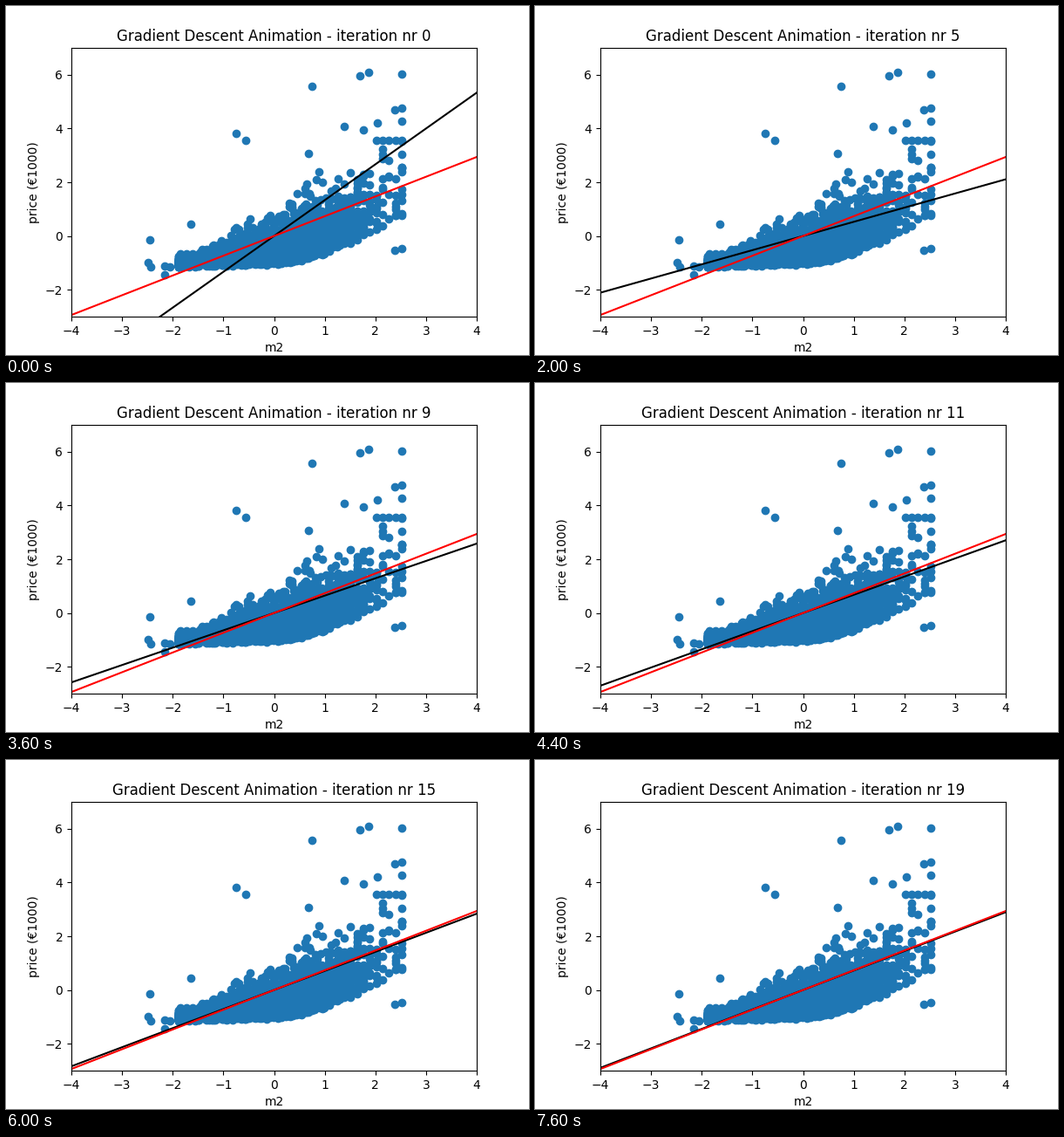
A matplotlib script for the animation above (8 s loop, 600 by 400 pixels).

```python
import numpy as np
import matplotlib.pyplot as plt
from matplotlib.animation import FuncAnimation

FRAMES, INTERVAL = 20, 400
BEST_SLOPE = 0.735
START_SLOPE = 4 / 3
DECAY = 0.81

SIZE_STEP = 0.126  # large homes come in rounded sizes
MIN_SIZE, MAX_SIZE = -1.88, 20 * SIZE_STEP

# Homes far from the main cloud: size, price
OUTLIERS = [
    (-0.75, 3.82), (-0.56, 3.56), (0.75, 5.57), (1.69, 5.96), (1.87, 6.09),
    (2.52, 6.03), (1.38, 4.08), (1.76, 3.95), (2.04, 4.20), (2.39, 4.69),
    (2.52, 4.75), (2.52, 4.27), (0.68, 3.07), (-2.46, -0.15), (-2.48, -1.0),
    (-2.43, -1.15), (-2.16, -1.13), (-2.05, -1.14), (-2.16, -1.43),
    (2.39, -0.53), (2.52, -0.47), (-1.64, 0.45),
]


def homes(count=1700):
    """Sizes are normal; prices are skewed and spread out as size grows."""
    rng = np.random.default_rng(11)
    size = np.clip(rng.normal(size=count), MIN_SIZE, MAX_SIZE)
    size = np.where(size > 1.3, np.round(size / SIZE_STEP) * SIZE_STEP, size)
    floor = -1.17 + 0.05 * (size + 1.9) + 0.35 * np.maximum(size, 0) ** 1.7
    price = floor + (3 + 1.2 * size) * rng.beta(1.5, 6, count)
    round_priced = [(k * SIZE_STEP, 3.56) for k in range(16, 21)]
    return np.vstack([np.column_stack([size, price]), OUTLIERS, round_priced]).T


def slope(i):
    return START_SLOPE if i == 0 else BEST_SLOPE * (1 - DECAY ** (i + 1))


plt.rcParams["font.family"] = "DejaVu Sans"
fig, ax = plt.subplots(figsize=(6, 4), dpi=100)
ax.scatter(*homes())
ends = np.array([-4, 4])
fit, = ax.plot(ends, START_SLOPE * ends, color="black")
ax.plot(ends, BEST_SLOPE * ends, color="red")
ax.set(xlim=(-4, 4), ylim=(-3, 7), xlabel="m2", ylabel="price (€1000)")
title = ax.set_title("")


def update(i):
    fit.set_ydata(slope(i) * ends)
    title.set_text(f"Gradient Descent Animation - iteration nr {i}")
    return fit, title


anim = FuncAnimation(fig, update, frames=FRAMES, interval=INTERVAL,
                     repeat=True, repeat_delay=0)
plt.show()
```
